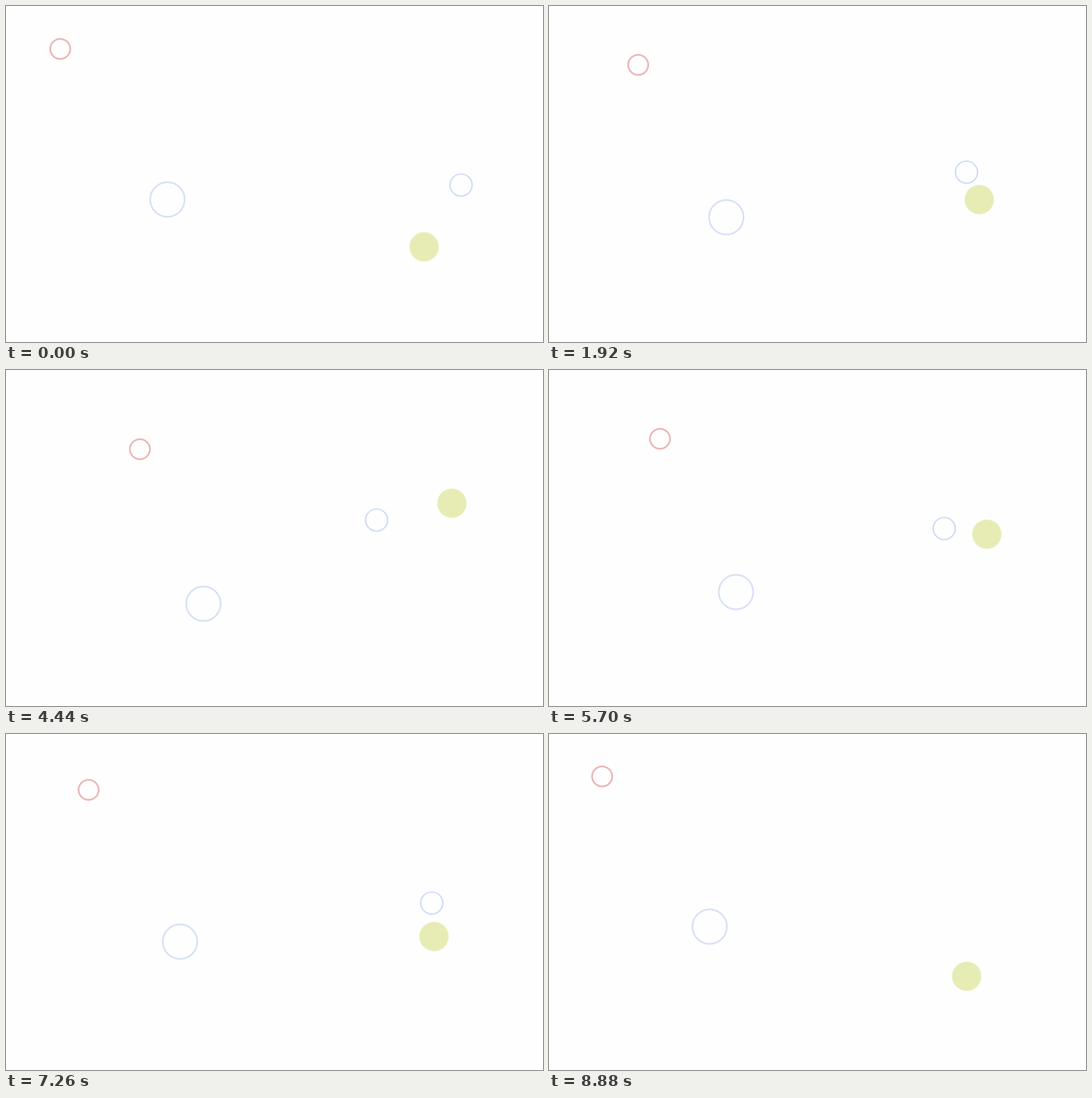
Recreate the animation shown at these times as an HTML page. Size 947 by 592 pixels, loop 8910 ms.

```html
<!DOCTYPE html>
<html lang="en">
<head>
<meta charset="utf-8">
<title>Drifting circles</title>
<style>
  html, body { margin: 0; width: 100%; height: 100%; overflow: hidden; background: #fefefe; }
  svg { display: block; width: 947px; height: 592px; }
  circle { fill: none; animation: 8910ms linear infinite; }

  .red   { stroke: #eaafb0; stroke-width: 2.8; animation-name: red; }
  .large { stroke: #d5def6; stroke-width: 2.8; animation-name: large; }
  .small { stroke: #c8d5f6; stroke-width: 2.2; animation-name: small; }
  .green { fill: #e7ecb4; animation-name: green; }
  .blink { animation: blink 8910ms step-end infinite; }

  /* Each circle drifts out and back; the loop restarts with a small jump. */
  @keyframes red {
    0%      { transform: translate(95.6px, 75.6px); }
    49.495% { transform: translate(237.16px, 140px); }
    100%    { transform: translate(92.71px, 74.29px); }
  }
  @keyframes large {
    0%      { transform: translate(284.6px, 340.9px); }
    49.327% { transform: translate(348.77px, 412.54px); }
    100%    { transform: translate(282.85px, 338.94px); }
  }
  @keyframes small {
    0%      { transform: translate(802.5px, 315.5px); }
    49.158% { transform: translate(651.39px, 263.6px); }
    100%    { transform: translate(807.7px, 317.28px); }
  }
  @keyframes green {
    0%      { transform: translate(737.2px, 424.3px); }
    49.495% { transform: translate(786.59px, 233.35px); }
    100%    { transform: translate(736.19px, 428.2px); }
  }
  /* The small ring vanishes just before the restart. */
  @keyframes blink {
    0% { opacity: 1; }
    99.6%, 100% { opacity: 0; }
  }
</style>
</head>
<body>
<svg viewBox="0 0 947 592">
  <circle class="red" r="17.7"/>
  <circle class="large" r="30.4"/>
  <g class="blink"><circle class="small" r="19.5"/></g>
  <circle class="green" r="25.8"/>
</svg>
</body>
</html>
```
